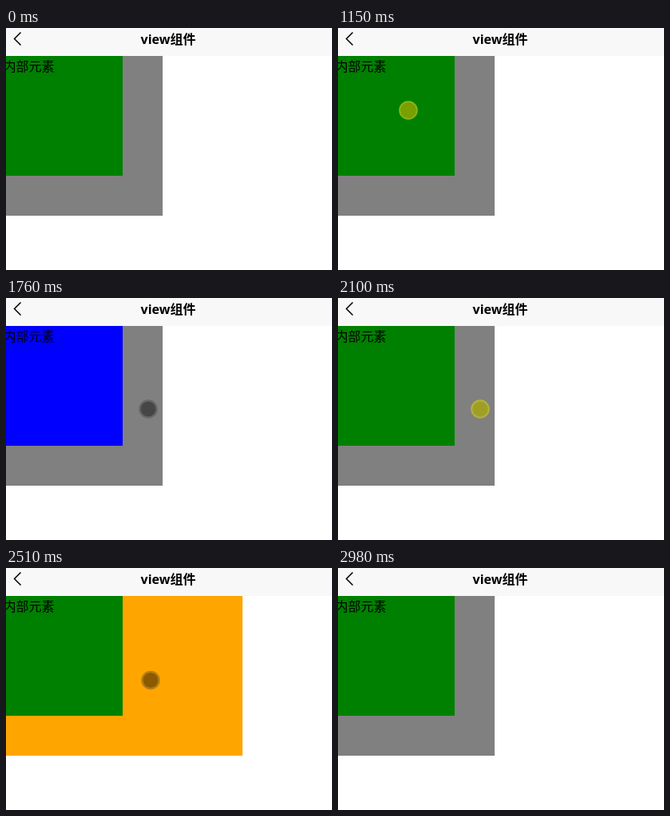
An HTML page for the animation above (3650 ms loop, 408 by 303 pixels).

```html
<!DOCTYPE html>
<html lang="zh">
<head>
<meta charset="utf-8">
<title>view组件</title>
<style>
  html, body { margin: 0; width: 100%; height: 100%; overflow: hidden; background: #fff; }
  svg { display: block; }
  text { font: 16px "Noto Sans", "Noto Sans CJK SC", "Noto Sans CJK", sans-serif; }
  .title { font-weight: 700; text-anchor: middle; }
  .pointer { --disc: rgba(0, 0, 0, .45); --ring: rgba(60, 60, 60, .38); }
  .pressed { --disc: rgba(172, 172, 0, .7); --ring: rgba(200, 200, 25, .7); }
  #disc { fill: var(--disc); }
  #ring { fill: none; stroke: var(--ring); stroke-width: 2.3; }
</style>
</head>
<body>
<svg width="408" height="303" viewBox="0 0 408 303">
  <rect width="408" height="35" fill="#f8f8f8"/>
  <path d="M18.5 5.5 L10.5 13.5 L18.5 21.5" fill="none" stroke="#000" stroke-width="1.5"/>
  <text class="title" x="203" y="19.5">view组件</text>
  <rect id="outer" y="35" width="196" height="200"/>
  <rect id="inner" y="35" width="146" height="150"/>
  <text x="-3.5" y="54">内部元素</text>
  <g id="pointer" class="pointer">
    <circle id="disc" r="9.5"/>
    <circle id="ring" r="10.65"/>
  </g>
</svg>
<script>
const LOOP = 3650;
const SAMPLE = 67.8; // pointer positions refresh about 15 times a second
const LEAD = 6;
const [outer, inner, pointer] =
  ['outer', 'inner', 'pointer'].map(id => document.getElementById(id));

const within = (t, start, end) => t >= start && t < end;
const progress = (t, start, end) => Math.min(1, Math.max(0, (t - start) / (end - start)));
const easeOut = (p, power) => 1 - (1 - p) ** power;
const smooth = p => p * p * (3 - 2 * p);

// The pointer sweeps in, settles on the inner box, crosses to the outer one, then nudges.
function pointerAt(t) {
  const enter = progress(t, 130, 610);
  const settle = progress(t, 610, 800);
  const cross = smooth(progress(t, 1390, 1750));
  const nudge = progress(t, 2440, 2500);
  return [
    379 - 268 * easeOut(enter, 1.6) - 23 * settle + 90 * cross + 3 * nudge,
    290 - 199 * easeOut(enter, 2) + 12 * settle + 36 * cross + 1.5 * nudge
  ];
}

function render(t) {
  const outerActive = within(t, 2170, 2910);
  outer.setAttribute('width', outerActive ? 296 : 196);
  outer.setAttribute('fill', outerActive ? '#ffa500' : '#808080');
  inner.setAttribute('fill', within(t, 1220, 1900) ? '#0000ff' : '#008000');

  const sampled = Math.floor((t + LEAD) / SAMPLE) * SAMPLE - LEAD;
  const pressed = within(t, 1150, 1420) || within(t, 2100, 2510);
  pointer.classList.toggle('pressed', pressed);
  pointer.setAttribute('visibility', within(t, 130, 2980) ? 'visible' : 'hidden');
  pointer.setAttribute('transform', `translate(${pointerAt(sampled)})`);
}

const startTime = performance.now();
function tick() {
  render((performance.now() - startTime) % LOOP);
  requestAnimationFrame(tick);
}
tick();
</script>
</body>
</html>
```
